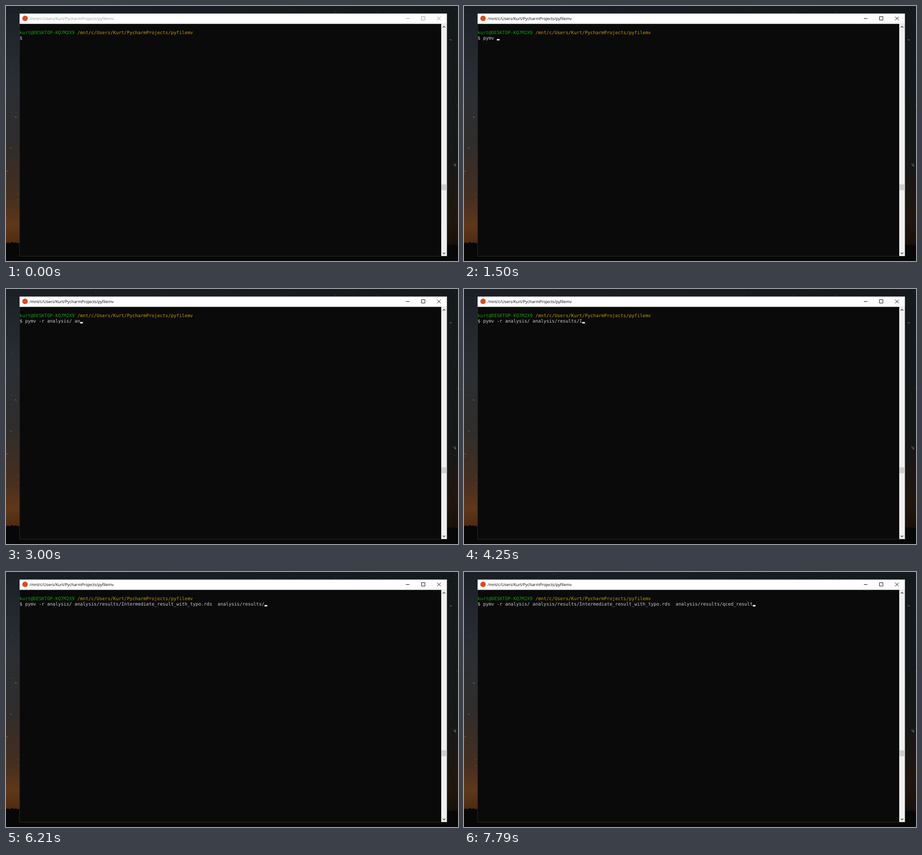
An HTML page that plays this animation: 997 by 562 pixels, repeating every 8 s.

```html
<!DOCTYPE html>
<html lang="en">
<head>
<meta charset="utf-8">
<title>Terminal</title>
<style>
  html, body { margin: 0; height: 100%; overflow: hidden; background: #000; }
  svg { display: block; width: 997px; height: 562px; }
  text { white-space: pre; text-rendering: geometricPrecision; }
  .mono { font: 10.08px "DejaVu Sans Mono", monospace; fill: #ccc; }
  .title { font: 8.86px "Open Sans", sans-serif; }
  #frame { fill: #000; stroke: #000; }
  #frame path { fill: none; }
  #frame.idle { fill: #999; stroke: #999; }
  #frame text { stroke: none; }
</style>
</head>
<body>
<svg viewBox="0 0 997 562">
  <defs>
    <linearGradient id="leftSky" x2="0" y2="1">
      <stop offset="0" stop-color="#1b2027"/>
      <stop offset=".3" stop-color="#2a2e34"/>
      <stop offset=".55" stop-color="#302d2b"/>
      <stop offset=".75" stop-color="#452e20"/>
      <stop offset=".86" stop-color="#5f3819"/>
      <stop offset=".93" stop-color="#4e2b10"/>
    </linearGradient>
    <linearGradient id="rightSky" x2="0" y2="1">
      <stop offset="0" stop-color="#14191c"/>
      <stop offset=".6" stop-color="#161818"/>
      <stop offset=".85" stop-color="#21160d"/>
      <stop offset="1" stop-color="#0f0b08"/>
    </linearGradient>
    <linearGradient id="topSky">
      <stop offset="0" stop-color="#1b2027"/>
      <stop offset="1" stop-color="#14191c"/>
    </linearGradient>
  </defs>

  <rect width="31" height="562" fill="url(#leftSky)"/>
  <rect x="972" width="25" height="562" fill="url(#rightSky)"/>
  <rect width="997" height="17" fill="url(#topSky)"/>
  <g id="stars"></g>
  <path d="M0 523l4-2 4 2 4-3 5 2 5-1 4 2 5-2v27H972V524l8 3 8-2 9 3v34H0z" fill="#080707"/>
  <g stroke-linecap="round" fill="none">
    <path d="M979 74l4 1" stroke="#8b9294"/>
    <path d="M987 349l6 4M991 347v6" stroke="#85867e"/>
    <path d="M20 244l3 1" stroke="#8f9092"/>
    <path d="M9 312l3 2" stroke="#858072"/>
    <path d="M1 363l3 1" stroke="#b66a3c"/>
  </g>

  <rect x="29.5" y="16" width="943.5" height="536" fill="#2b2b2b"/>
  <rect x="30" y="16.7" width="942.5" height="23" fill="#fff"/>
  <rect x="30.5" y="39.5" width="930" height="511.5" fill="#0a0a0a"/>
  <circle cx="42" cy="27.3" r="6" fill="#e0481f"/>
  <g id="frame">
    <text class="title" x="52" y="31">/mnt/c/Users/Kurt/PycharmProjects/pyfilemv</text>
    <path d="M882 27.5h8M916.5 23.5h7.5v7.5h-7.5zM951 23.5l8 8m0-8l-8 8"/>
  </g>

  <rect x="960" y="39.5" width="12.5" height="511.5" fill="#f0f0f0"/>
  <rect x="960.5" y="393" width="12" height="13" fill="#cdcdcd"/>
  <path d="M963.5 47.5l2.7-2.7 2.7 2.7M963.5 543.5l2.7 2.7 2.7-2.7" fill="none" stroke="#404040" stroke-width="1.4"/>

  <text class="mono" x="30" y="61.5"><tspan fill="#13a10e">kurt@DESKTOP-KQ7M2X9</tspan> <tspan fill="#c19c00">/mnt/c/Users/Kurt/PycharmProjects/pyfilemv</tspan></text>
  <text class="mono" id="command" x="30" y="73.9">$ </text>
  <rect id="cursor" y="72.8" width="6" height="3" fill="#fff"/>
</svg>
<script>
const LOOP = 8000, FOCUS = 120, CELL = 6.07;
const $ = id => document.getElementById(id);

// Time and text added: single keys, or a whole tab completion.
const keys = [
  [750, "p"], [880, "y"], [1000, "m"], [1210, "v"], [1500, " "],
  [1580, "-"], [1750, "r"], [1920, " "], [2080, "a"], [2250, "n"],
  [2500, "alysis/"], [2750, " "], [2880, "a"], [3000, "n"], [3250, "alysis/"],
  [3750, "r"], [3900, "e"], [4080, "sults/"], [4250, "I"],
  [4500, "ntermediate_result_with_typo.rds "], [4790, " "], [5000, "a"],
  [5250, "n"], [5460, "alysis/"], [5750, "r"], [5920, "e"], [6170, "sults/"],
  [6750, "q"], [6880, "c"], [7000, "e"], [7130, "d"], [7290, "_"],
  [7420, "r"], [7540, "e"], [7630, "s"], [7670, "u"], [7710, "l"], [7790, "t"]
];

function scatterStars() {
  let seed = 7;
  const random = () => (seed = seed * 16807 % 2147483647) / 2147483647;
  let dots = "";
  for (let i = 0; i < 70; i++) {
    const side = i % 3;
    const x = side === 0 ? random() * 29 : side === 1 ? 974 + random() * 23 : random() * 997;
    const y = random() * (side === 2 ? 15 : 480);
    dots += `<circle cx="${x}" cy="${y}" r="${0.3 + random() * 0.4}" fill="#9aa0a4" opacity="${0.2 + random() * 0.5}"/>`;
  }
  $("stars").innerHTML = dots;
}

function draw(now) {
  const t = now % LOOP;
  const line = "$ " + keys.filter(([at]) => at <= t).map(([, text]) => text).join("");
  $("command").textContent = line;
  $("cursor").setAttribute("x", 30 + CELL * line.length);
  $("cursor").style.opacity = t < FOCUS ? 0 : 1;
  $("frame").setAttribute("class", t < FOCUS ? "idle" : "");
  requestAnimationFrame(draw);
}

scatterStars();
requestAnimationFrame(draw);
</script>
</body>
</html>
```
